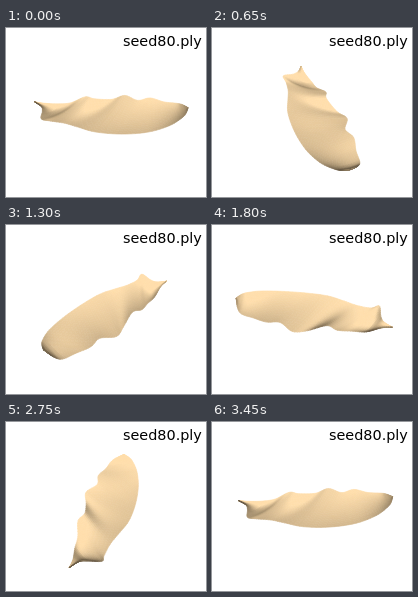
These frames come from a looping animation (200 by 169 pixels, 3500 ms). An HTML page with a canvas:

```html
<!DOCTYPE html>
<html lang="en">
<head>
<meta charset="utf-8">
<title>seed80.ply</title>
<style>
  html, body { margin: 0; width: 100%; height: 100%; overflow: hidden; background: #fff; }
  canvas, svg { position: absolute; left: 0; top: 0; width: 200px; height: 169px; }
  text { font: 14.4px "DejaVu Sans", sans-serif; }
</style>
</head>
<body>
<canvas id="view" width="200" height="169"></canvas>
<svg viewBox="0 0 200 169"><text x="117" y="18">seed80.ply</text></svg>
<script>
const ctx = document.getElementById('view').getContext('2d');
const LOOP = 3500, STEP = 50;
const ROWS = 78, COLS = 18;
const SIN = 0.72, COS = 0.69, DIST = 300, CX = 102, CY = 85;

// Both margins of the leaf, from stalk to apex
const wavy = [
  [-76, -16, 0], [-66, -16, -2], [-52, -19, -5.8], [-39, -20, -5], [-24, -24, -0.3],
  [-14, -20, 0.6], [4, -24, -4], [18, -28, -2], [31, -19, -0.7], [44, -21, 0.9],
  [58, -16, 0], [70, -13, 1], [75, -8, 4], [78, 1, 8.7]
];
const smooth = [
  [-76, -16, 0], [-68, -9, 0], [-66, -2, 0], [-65, 9.7, 2], [-57, 9.4, -1.5],
  [-43, 12, -1.7], [-30, 17, -1.5], [-12, 23.5, -1.6], [13, 26, -1.7], [38, 24.7, -0.3],
  [58, 19.7, 3], [70, 13, 6], [75, 8, 7.5], [78, 1.4, 8.7]
];

// Catmull-Rom through the points, t in 0..1
function spline(pts, t) {
  const last = pts.length - 1;
  const i = Math.min(last - 1, Math.floor(t * last));
  const f = t * last - i;
  const p = k => pts[Math.max(0, Math.min(last, i + k))];
  return [0, 1, 2].map(c => {
    const a = p(-1)[c], b = p(0)[c], d = p(1)[c], e = p(2)[c];
    return b + 0.5 * f * (d - a + f * (2 * a - 5 * b + 4 * d - e + f * (3 * (b - d) + e - a)));
  });
}

const mesh = [];
for (let r = 0; r <= ROWS; r++) {
  const t = r / ROWS;
  const a = spline(wavy, t), b = spline(smooth, t);
  const hollow = (2.2 + 3 * Math.exp(-(((t - 0.2) / 0.12) ** 2))) * Math.min(1, 6 * t, 6 * (1 - t));
  const row = [];
  for (let c = 0; c <= COLS; c++) {
    const v = c / COLS;
    const p = a.map((x, k) => x + (b[k] - x) * v);
    p[2] -= hollow * 4 * v * (1 - v);
    row.push(p);
  }
  mesh.push(row);
}

function project([x, y, z], cos, sin) {
  const X = x * cos - y * sin, Y = x * sin + y * cos;
  const depth = COS * Y + SIN * z;
  const s = DIST / (DIST - depth);
  return { X, Y, z, depth, sx: CX + s * X, sy: CY + s * (SIN * Y - COS * z) };
}

// Light shines from the camera
function shade(a, b, c, d) {
  const ux = c.X - a.X, uy = c.Y - a.Y, uz = c.z - a.z;
  const vx = d.X - b.X, vy = d.Y - b.Y, vz = d.z - b.z;
  const nx = uy * vz - uz * vy, ny = uz * vx - ux * vz, nz = ux * vy - uy * vx;
  const lit = Math.abs(COS * ny + SIN * nz) / (Math.hypot(nx, ny, nz) || 1);
  const k = Math.min(1, 0.4 + 0.72 * lit);
  return `rgb(${[255, 222, 172].map(ch => Math.round(ch * k))})`;
}

function draw(time) {
  const angle = 2 * Math.PI * time / LOOP;
  const cos = Math.cos(angle), sin = Math.sin(angle);
  const pts = mesh.map(row => row.map(p => project(p, cos, sin)));
  const quads = [];
  for (let r = 0; r < ROWS; r++) {
    for (let c = 0; c < COLS; c++) {
      const q = [pts[r][c], pts[r][c + 1], pts[r + 1][c + 1], pts[r + 1][c]];
      quads.push({ q, depth: q.reduce((sum, p) => sum + p.depth, 0) });
    }
  }
  quads.sort((m, n) => m.depth - n.depth);

  ctx.fillStyle = '#fff';
  ctx.fillRect(0, 0, 200, 169);
  ctx.lineWidth = 0.6;
  ctx.lineJoin = 'round';
  for (const { q } of quads) {
    ctx.fillStyle = ctx.strokeStyle = shade(...q);
    ctx.beginPath();
    q.forEach(p => ctx.lineTo(p.sx, p.sy));
    ctx.closePath();
    ctx.fill();
    ctx.stroke();
  }
}

const start = performance.now();
let shown = 0;
function tick() {
  const time = Math.floor((performance.now() - start) % LOOP / STEP) * STEP;
  if (time !== shown) draw(shown = time);
  requestAnimationFrame(tick);
}
draw(0);
requestAnimationFrame(tick);
</script>
</body>
</html>
```
